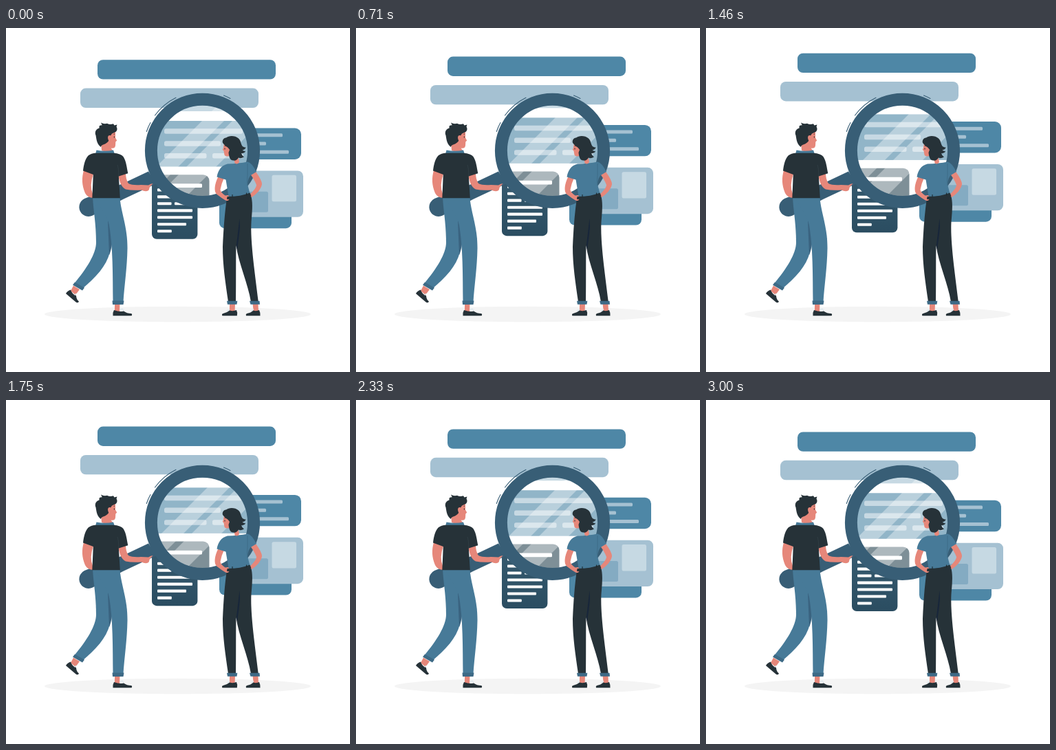
An HTML page for the animation above (3.04 s loop, 500x500 px).

```html
<!DOCTYPE html>
<html lang="en">
<head>
<meta charset="utf-8">
<title>Search</title>
<style>
html, body { margin: 0; width: 100%; height: 100%; overflow: hidden; background: #fff; }
svg { display: block; width: 100vw; height: 100vh; }
.blue { fill: #4e87a6; }
.pale { fill: #a5c1d2; }
.steel { fill: #385e76; }
.ink { fill: #263238; }
.skin { fill: #e6877a; }
.denim { fill: #477a98; }
.cuff { fill: #3d6a86; }
.white { fill: #fff; }
.arc { fill: none; stroke: #385e76; stroke-width: 1.1; stroke-linecap: round; }
</style>
</head>
<body>
<svg viewBox="0 0 500 500">
  <defs>
    <clipPath id="lens"><circle cx="285.5" cy="178.3" r="66"/></clipPath>
    <linearGradient id="sheet" x1="0" y1="0" x2="0" y2="1">
      <stop offset="0" stop-color="#365b70"/><stop offset="1" stop-color="#2b4d61"/>
    </linearGradient>
  </defs>

  <ellipse cx="249.5" cy="416" rx="193.5" ry="11.3" fill="#f4f4f4"/>

  <g class="float">
    <rect class="blue" x="133" y="46.2" width="259" height="28.4" rx="8"/>
    <rect class="pale" x="108" y="87.6" width="259" height="28.4" rx="8"/>
    <rect class="blue" x="300" y="145.6" width="129" height="45.4" rx="9"/>
    <g class="pale">
      <rect x="310" y="153.2" width="92" height="5" rx="1.5"/>
      <rect x="310" y="165.4" width="68" height="5" rx="1.5"/>
      <rect x="310" y="177.8" width="101" height="5" rx="1.5"/>
    </g>
    <rect class="blue" x="310" y="225" width="105" height="66.2" rx="8"/>
    <rect class="pale" x="325" y="207.5" width="107" height="67.3" rx="8"/>
    <rect x="386.5" y="213.8" width="35.5" height="38.4" rx="2.5" fill="#c6d9e3"/>
    <rect x="335" y="237.8" width="46" height="30" rx="2.5" fill="#84abc2"/>
    <rect x="212" y="220" width="66.4" height="86.8" rx="7" fill="url(#sheet)"/>
    <g class="white" id="notes"></g>
  </g>

  <g clip-path="url(#lens)">
    <rect class="white" x="210" y="105" width="150" height="150"/>
    <g class="float">
      <rect class="pale" x="200" y="80" width="170" height="41" />
      <rect class="blue" x="200" y="135" width="180" height="66.5"/>
      <g class="pale">
        <rect x="230" y="146.3" width="114" height="7.5" rx="2.5"/>
        <rect x="230" y="164.2" width="82" height="7.5" rx="2.5"/>
        <rect x="230" y="182" width="61.5" height="7.5" rx="2.5"/>
        <rect x="300" y="182" width="45" height="7.5" rx="2.5"/>
      </g>
      <rect x="200" y="213.2" width="95.5" height="80" rx="9" fill="#2f4a57"/>
      <rect class="white" x="215" y="226.3" width="70" height="5.8" rx="1.5"/>
    </g>
    <rect class="white" x="210" y="105" width="150" height="150" opacity=".38"/>
    <path class="white" opacity=".36" d="M320 100H352L202 250H170ZM364 100H407L257 250H214Z"/>
  </g>

  <path class="steel" d="M207 208.500L170 226L114 248A13.600 13.600 0 0 0 126 272.500L170 249L219 226Z"/>
  <circle cx="285.5" cy="178.3" r="74.600" fill="none" stroke="#385e76" stroke-width="18"/>
  <path class="arc" d="M216.500 127A86 86 0 0 1 247 101.300M204.300 150.500A86 86 0 0 1 210 137.500M316.500 98A86 86 0 0 1 326 102.500"/>

  <g id="man">
    <path class="skin" d="M113 207C110 218 110 228 115 240Q118 246 126 247V241Q121 229 127 212Z"/>
    <path class="denim" d="M126 246C127 266 131 284 131 312C131 328 117 350 99.500 371L111.500 378.500C130 363 146 346 151 326L157 247Z"/>
    <path d="M148 280L150 330C154 320 155 308 155 299Z" fill="#3a6380"/>
    <path class="denim" d="M130 246.500H165.500C167 268 177 290 176.500 320C176 350 172 374 170.500 398H155.500C155 362 156 318 149 281Z"/>
    <path class="skin" d="M158 401H165.500L165 412H158ZM98 374.500L107 380L101 388L94 382Z"/>
    <path class="cuff" d="M154.500 396.400H171.500L170.500 402H155ZM100 369.500L114 377.500L111 381.500L97 373.500Z"/>
    <path class="ink" d="M157 410Q165 413 171 411.500Q176 415 182 415Q184 416 182.500 418.300H155.500Q155 413 157 410ZM94 380.500Q96 387 102 389Q102 394 106 397.500Q105 400 102 398.800Q94 392 87 386Q89 382 94 380.500Z"/>
    <path d="M166 409.500L169 408L171 411M99 388L102.500 386" fill="none" stroke="#dce8ef" stroke-width="1.2"/>

    <path class="skin" d="M138 165L139 178Q147 181 155 178L152.500 174.500Q158 176 159 171L159.300 165.500L161.200 163.500L159 159.500V151L147 148Z"/>
    <path class="ink" d="M137.800 173C139 169 143 170 147 166.500L149.300 164C146.500 158 149 155 152 156.500L154 153.500L159.800 150.800C162.500 148 161.500 145 160.500 143.500L161.500 140.500L157.500 141.500L156 139.200Q151 141 147 138.800Q142 140 138 137.600L139.700 141.200C134 141 136 144 135.500 145.500C130 147 128.800 152 130.500 156C131.500 161 131.500 168 137.800 173Z"/>
    <path class="ink" d="M155.300 154.300L158 153.500V154.500ZM156.800 157.500h1v2h-1Z"/>
    <path class="denim" d="M131.500 177.500Q144 180 156 177.500L158 183H130Z"/>
    <path class="skin" d="M163 213C165 223 167 231 174 234.500Q183 236.500 197 235.500Q203 239 207.500 235.800L209 231L213.500 226.300Q211 226 207 228.500L196 228Q184 229 178 226Q174 220 174 211Z"/>
    <path class="ink" d="M131 181.800H156Q167 182.500 170.500 187C175 194 175.500 203 177.300 211.200L163.800 215.500L165.800 247.300H125.300L126.800 213L112 207.500C113 199 115 190 119.500 185.500Q124 182 131 181.800Z"/>
    <path d="M163.800 215.500Q164 205 162 199" fill="none" stroke="#36454c" stroke-width=".6"/>
  </g>

  <g id="woman">
    <path class="skin" d="M325 401H333L332.500 413H325ZM358.500 401H366.500L367 413H360Z"/>
    <path class="ink" d="M321 247L355.500 241.500C359 252 358 264 357 276C354 303 361 350 366.800 398H356C352 372 338 342 334.500 316C334 340 334.500 370 334 398H323C319 370 315 345 315 318C316 292 318 268 321 247Z"/>
    <path d="M339.500 277L334.800 316L336 322C338 305 341 294 339.500 277Z" fill="#18263a"/>
    <path class="cuff" d="M321 396.800H336.300L335.500 401.800H322ZM354 396.800H368.500L369 401.800H355.500Z"/>
    <path class="ink" d="M335 410Q337 414 335.800 418.300H314.500Q313 416 315.500 415Q321 414 325 410.500Q330 412 335 410ZM368 410Q370 414 369.500 418.300H349Q348 416 350 415Q356 414 359.500 410.500Q364 412 368 410Z"/>
    <path d="M321 411.500L325 408.500M356 411.500L360 408.500" stroke="#dce8ef" stroke-width="1.2"/>

    <path class="skin" d="M308.500 216C303 227 302 237 306 241.500Q313 247 319 250.500Q324 252.500 325.300 247L323.500 243L318.500 243.500Q312 239 311.500 235Q313 226 317 218ZM354 211L362 207.500Q372 221 372 227C371 234 364 242 357 246L353.500 242.500C361 236 364 231 364 228Q361 220 354 211Z"/>
    <path class="denim" d="M322 197.500Q338 197 351 194.500Q357 195.500 364 209L355 214.500Q350 223 351.500 229L354.500 240.500Q338 246 323.500 244.500L319.500 220.500L306.500 216.500C308 208 312 200 322 197.500Z"/>
    <path d="M351 197V214Q350 222 351 229" fill="none" stroke="#3b6882" stroke-width=".7"/>
    <path class="ink" d="M321.500 245Q339 245.500 354.500 239.500L356.500 244.500Q340 250 321 249Z"/>
    <path d="M329 242v4M349.500 239.500v4" stroke="#1b262b" stroke-width="1"/>
    <path class="skin" d="M317 168L315.800 174.500L314.800 177L316.500 178.500L317.500 184.500Q319 187.500 324 186L329 178L325 168ZM331 187L332.500 196.500Q337 199 339 194.800L337 185Z"/>
    <path class="ink" d="M315 167C313.500 162 318 159 320 159.500C324 156 333 156 338 160.500C342 164 341 170 344.500 172.500Q347 174 349 173.500Q347 177 343.500 177.500Q346 179.500 348.300 179.300Q346 183 342 182Q343 186 346 187.500Q341 190.500 338 188.500Q334 194 331 192.500C325 193 324 186 323.500 181L325 177Q323 174 321.500 173Q319 172 315 167Z"/>
    <path class="ink" d="M316.700 171.500L319.800 171V172ZM317.500 174.500h1v2h-1Z"/>
  </g>
</svg>
<script>
const LOOP = 73, STEP = 1000 / 24, RISE = 10;

// Sheet text lines: x, y, width
const lines = [
  [220, 233.3, 51], [220, 243.3, 51], [220, 253.2, 20.5], [245, 253.2, 26],
  [220, 263.3, 51], [220, 273.2, 51], [220, 283.2, 42], [220, 293.2, 20.8]
];
document.getElementById('notes').innerHTML = lines.map(([x, y, w]) =>
  `<rect x="${x}" y="${y}" width="${w}" height="4.1" rx="1"/>`).join('');

const floats = document.querySelectorAll('.float');
const start = performance.now();

function draw(now) {
  const t = Math.max(0, now - start);
  const tick = Math.floor((t + 5) / STEP) % LOOP;
  const phase = (tick / LOOP + 0.021) % 1;
  const lift = 1 - Math.abs(1 - 2 * phase);
  const y = 0.42 - RISE * lift;
  floats.forEach(el => el.setAttribute('transform', `translate(0 ${y.toFixed(3)})`));
  requestAnimationFrame(draw);
}
draw(start);
</script>
</body>
</html>
```
